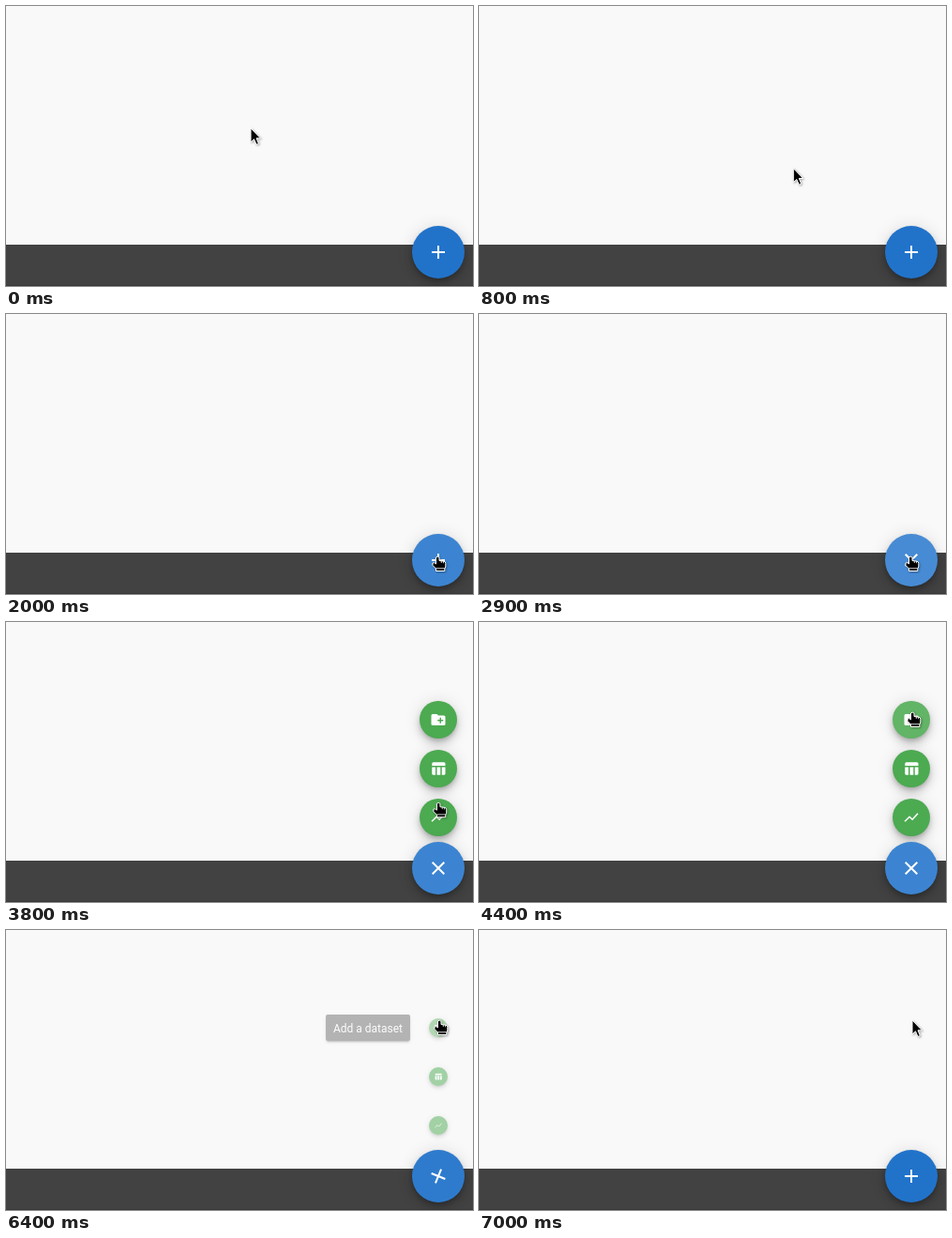
These frames come from a looping animation (498 by 298 pixels, 8.5 s). An HTML page:

```html
<!DOCTYPE html>
<html lang="en">
<meta charset="utf-8">
<title>Speed dial</title>
<style>
  html, body { margin: 0; width: 100%; height: 100%; overflow: hidden; background: #f9f9f9; }
  #stage { position: relative; width: 498px; height: 298px; overflow: hidden; }
  #stage > * { position: absolute; }
  #bar { left: 0; top: 254px; width: 498px; height: 43px; background: #424242; border-bottom: 1px solid #3b383a; }
  .btn {
    border-radius: 50%; overflow: hidden;
    box-shadow: 0 3px 5px -1px #0003, 0 6px 10px #00000024, 0 1px 18px #0000001f;
  }
  .btn > * { position: absolute; }
  .hover { inset: 0; background: #fff; opacity: 0; }
  .ripple { border-radius: 50%; background: #fff; }
  .btn svg { inset: 0; margin: auto; fill: #fff; }
  .btn .line { fill: none; stroke: #fff; stroke-width: 2; }
  #tip {
    left: 341px; top: 90px; width: 90px; height: 28px; border-radius: 2px;
    background: #707070; color: #fff; font: 12px/30px Roboto, sans-serif; text-align: center; white-space: nowrap;
    box-shadow: 0 3px 1px -2px #0003, 0 2px 2px #00000024, 0 1px 5px #0000001f;
  }
  #cursor { left: 0; top: 0; overflow: visible; filter: drop-shadow(1px 1px 1px #0005); }
</style>
<div id="stage">
  <div id="bar"></div>
  <div id="tip">Add a dataset</div>
</div>
<script>
const stage = document.getElementById('stage');
const tip = document.getElementById('tip');
const LOOP = 8500, STEP = 100, HOVER = .12;

function button(y, radius, color, iconSize, shape) {
  const el = document.createElement('div');
  el.className = 'btn';
  el.style.cssText = `left:${461 - radius}px;top:${y - radius}px;width:${2 * radius}px;height:${2 * radius}px;background:${color}`;
  el.innerHTML = `<div class="hover"></div><div class="ripple"></div>
    <svg width="${iconSize}" height="${iconSize}" viewBox="0 0 24 24">${shape}</svg>`;
  stage.append(el);
  const [hover, ripple, icon] = el.children;
  return { el, hover, ripple, icon };
}

const [folder, table, chart] = [
  `<path fill-rule="evenodd" d="M4 4h6l2 2h8a2 2 0 0 1 2 2v10a2 2 0 0 1-2 2H4a2 2 0 0 1-2-2V6a2 2 0 0 1 2-2z
    M14 9h2v3h3v2h-3v3h-2v-3h-3v-2h3z"/>`,
  `<path d="M3 8V5a2 2 0 0 1 2-2h15a2 2 0 0 1 2 2v3z
    M3 10h5v11H5a2 2 0 0 1-2-2z M10 10h5v11h-5z M17 10h5v9a2 2 0 0 1-2 2h-3z"/>`,
  '<path class="line" d="M2.7 17.7 9.5 11l4 4 7.8-8.8"/>',
].map((shape, i) => button(104 + 52 * i, 20, '#4caa51', 18, shape));
const fab = button(262, 28, '#2173ca', 24, '<path class="line"/>');
const cross = fab.icon.firstChild;

stage.insertAdjacentHTML('beforeend', `
  <svg id="cursor" width="20" height="20" stroke="#fff" stroke-linejoin="round">
    <path id="arrow" d="M0 0V15L3.5 11.8 6 17.5 8.4 16.4 6 10.8H10.4Z"/>
    <g id="hand">
      <path d="M-1.5 1Q.3-.8 2 1V4.5L7 5.2Q8.8 5.6 8.8 7.5V11L7.8 13V15.5H-1.5V13L-5 9.5V7Q-3.5 5.8-1.5 8Z"/>
      <path d="M-1.5 12.7H7.8M4.3 5v2M6.5 5.3v2" stroke-width=".8"/>
    </g>
  </svg>`);
const cursor = document.getElementById('cursor');
const arrow = document.getElementById('arrow');
const hand = document.getElementById('hand');

const clamp = (v, min, max) => Math.min(max, Math.max(min, v));
const ramp = (t, start, end) => clamp((t - start) / (end - start), 0, 1);
// Fades in after start and out after end.
const shown = (t, start, end, fade = 200) => ramp(t, start, start + fade) - ramp(t, end, end + fade);

const moves = [
  { start: 300, end: 600, x: 306, y: 153 },
  { start: 700, end: 1000, x: 404, y: 219 },
  { start: 1100, end: 1300, x: 434, y: 244 },
  { start: 1500, end: 2000, x: 460, y: 258 },
  { start: 3500, end: 4100, x: 462, y: 117 },
  { start: 4200, end: 4400, x: 462, y: 96 },
];

function cursorAt(t) {
  let x = 261, y = 130;
  for (const move of moves) {
    const p = ramp(t, move.start, move.end) ** 1.1;
    x += (move.x - x) * p;
    y += (move.y - y) * p;
  }
  return [x, y];
}

function setRipple({ ripple }, x, y, radius, opacity) {
  ripple.style.cssText = `left:${x - radius}px;top:${y - radius}px;width:${2 * radius}px;height:${2 * radius}px;opacity:${opacity}`;
}

function render(t) {
  const [x, y] = cursorAt(t);
  cursor.style.transform = `translate(${x}px, ${y}px)`;
  const pointing = t >= 1600 && t < 7000;
  hand.style.display = pointing ? '' : 'none';
  arrow.style.display = pointing ? 'none' : '';

  const open = shown(t, 3000, 6300);
  for (const { el } of [folder, table, chart]) {
    el.style.opacity = open;
    el.style.transform = `scale(${open})`;
  }
  tip.style.opacity = shown(t, 4700, 6300);

  // The plus turns into a slightly longer cross.
  const turn = shown(t, 2600, 6300);
  const arm = 7 + 1.9 * turn;
  cross.setAttribute('d', `M${12 - arm} 12h${2 * arm}M12 ${12 - arm}v${2 * arm}`);
  fab.icon.style.transform = `rotate(${45 * turn}deg)`;

  fab.hover.style.opacity = HOVER * shown(t, 1500, 6300);
  table.hover.style.opacity = HOVER * shown(t, 3900, 4200);
  folder.hover.style.opacity = HOVER * shown(t, 4200, 6300);

  setRipple(fab, 27, 24, 40 * ramp(t, 2500, 2800), HOVER * shown(t, 2400, 2800));
  setRipple(folder, 22, 15, 19 * clamp(Math.floor((t - 5800) / 200), 0, 2), HOVER);
}

function frame(now) {
  render(Math.floor(now % LOOP / STEP) * STEP);
  requestAnimationFrame(frame);
}
requestAnimationFrame(frame);
</script>
</html>
```
